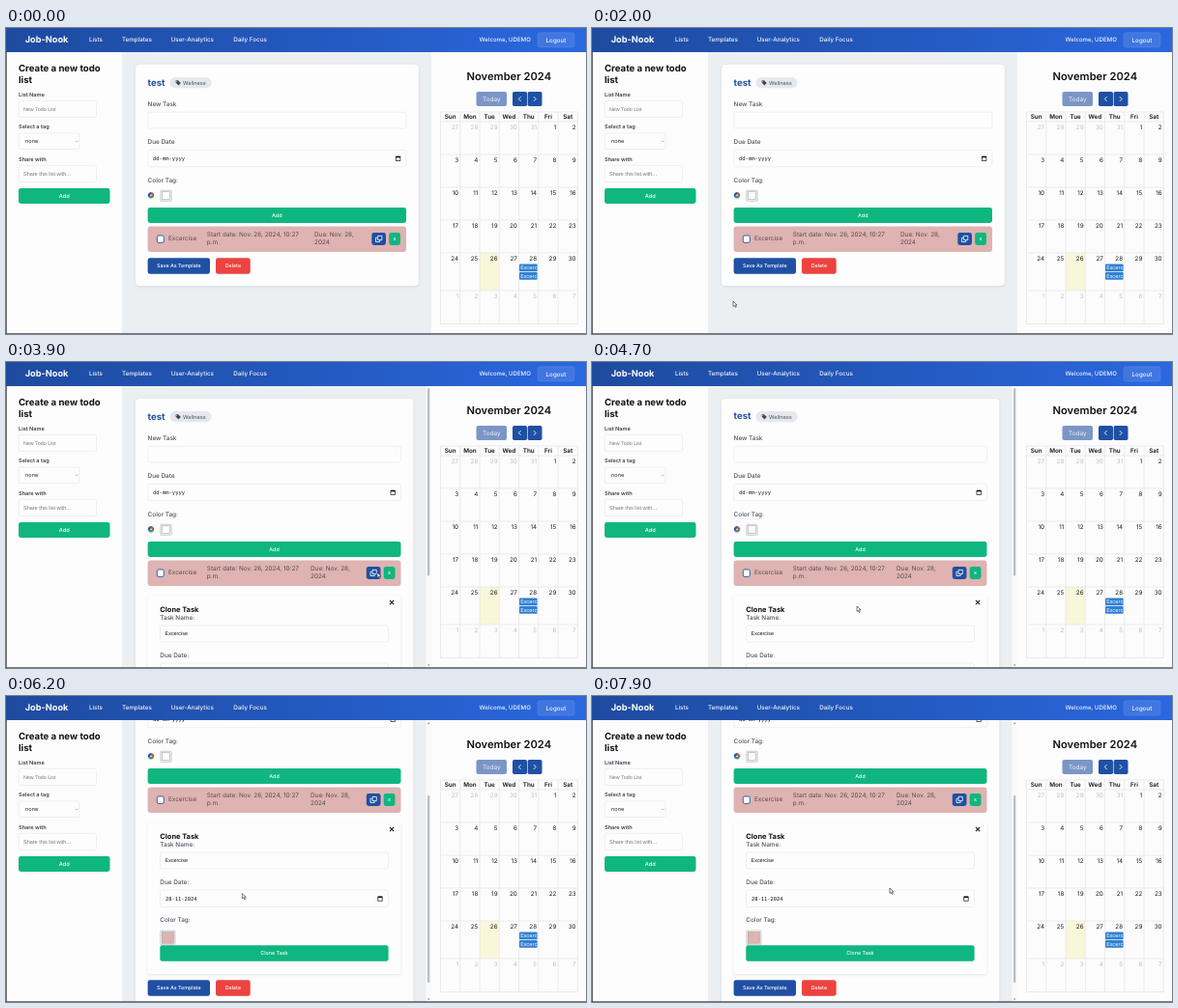
These frames come from a looping animation (600x317 px, 8000 ms). An HTML page:

```html
<!DOCTYPE html>
<html lang="en">
<head>
<meta charset="utf-8">
<title>Todo list</title>
<style>
  html, body { margin: 0; width: 100%; height: 100%; overflow: hidden; background: #fcfcfd; }
  svg { display: block; width: 600px; height: 317px; }
  text { font-family: Inter, sans-serif; text-rendering: geometricPrecision; white-space: pre; }
  .field { font-family: "Liberation Sans", Arial, sans-serif; }
  .mono { font-family: "DejaVu Sans Mono", monospace; }
  .card { filter: drop-shadow(0 1px 1.5px rgba(0, 0, 0, .09)); }
</style>
</head>
<body>
<svg id="stage" viewBox="0 0 600 317">
  <defs>
    <linearGradient id="bar">
      <stop offset="0" stop-color="#1e4b9f"/>
      <stop offset=".5" stop-color="#2358bd"/>
      <stop offset="1" stop-color="#2b68df"/>
    </linearGradient>
    <clipPath id="mainClip"><rect x="120" y="25" width="320" height="292"/></clipPath>
    <clipPath id="eventClip"><rect x="531" y="240" width="18.8" height="24"/></clipPath>
  </defs>
</svg>
<script>
const NS = "http://www.w3.org/2000/svg";
const stage = document.getElementById("stage");
const BLUE = "#1f50a3", GREEN = "#10b67f", RED = "#ec4340", PINK = "#deb3b1";
const INK = "#111", GREY = "#4b525c", LINE = "#e4e6ea";

function add(parent, tag, attrs, content) {
  const el = document.createElementNS(NS, tag);
  for (const key in attrs) el.setAttribute(key, attrs[key]);
  if (content !== undefined) el.textContent = content;
  parent.appendChild(el);
  return el;
}
const group = (parent, attrs = {}) => add(parent, "g", attrs);
const box = (parent, x, y, x2, y2, fill, more = {}) =>
  add(parent, "rect", { x, y, width: x2 - x, height: y2 - y, fill, ...more });
const path = (parent, d, stroke, width, more = {}) =>
  add(parent, "path", { d, fill: "none", stroke, "stroke-width": width, ...more });
const label = (parent, x, y, content, size, fill, weight = 400, more = {}) =>
  add(parent, "text", { x, y, "font-size": size, fill, "font-weight": weight, ...more }, content);
const mid = { "text-anchor": "middle" };

function button(parent, x, y, x2, y2, fill, content, size = 5.35) {
  box(parent, x, y, x2, y2, fill, { rx: 2.4 });
  label(parent, (x + x2) / 2, (y + y2) / 2 + size * .36, content, size, "#fff", 500, mid);
}
function input(parent, x, y, x2, y2) {
  box(parent, x, y, x2, y2, "#fdfdfe", { rx: 2, stroke: LINE, "stroke-width": .6 });
}
function dateIcon(parent, x, y) {
  box(parent, x - 2.2, y - 1.8, x + 2.2, y + 2.4, "none", { stroke: "#111", "stroke-width": .7 });
  box(parent, x - 2.2, y - 2.2, x + 2.2, y - .7, "#111");
}
function swatch(parent, x, y, x2, y2, fill) {
  box(parent, x, y, x2, y2, "#f0f0f0", { stroke: "#b5b5b5", "stroke-width": .6, rx: .6 });
  box(parent, x + 1.6, y + 1.6, x2 - 1.6, y2 - 1.6, fill, { stroke: "#999", "stroke-width": .5 });
}

function sidebar(g) {
  box(g, 0, 25, 120, 317, "#fcfcfd");
  label(g, 13, 45.2, "Create a new todo", 9.6, INK, 700);
  label(g, 13, 56.8, "list", 9.6, INK, 700);
  label(g, 13, 70.8, "List Name", 5.6, "#3a414c", 600);
  input(g, 13.2, 75.3, 93.5, 92.5);
  label(g, 18, 85.8, "New Todo List", 5.35, "#767676", 400, { class: "field" });
  label(g, 13, 104.2, "Select a tag", 5.6, "#3a414c", 600);
  input(g, 13.2, 109, 76, 125.5);
  label(g, 20, 119.3, "none", 5.6, "#222");
  path(g, "M72 116.8l1.3 1.3 1.3-1.3", "#7d8a99", .6);
  label(g, 13, 138, "Share with", 5.6, "#3a414c", 600);
  input(g, 13.2, 142.3, 93.5, 159.5);
  label(g, 18, 152.8, "Share this list with...", 5.5, "#767676", 400, { class: "field" });
  button(g, 13, 166, 107.5, 182, GREEN, "Add", 5.7);
}

function calendar(g) {
  const left = 449.5, step = 20.26, rows = [97, 131, 165, 199, 233, 272, 306.5];
  box(g, 440, 25, 600, 317, "#fcfcfd");
  label(g, 520.3, 54, "November 2024", 11.2, INK, 600, mid);
  box(g, 486.5, 66, 518, 81, "#7b96c6", { rx: 2 });
  label(g, 502.3, 75.7, "Today", 6.4, "#e9eff8", 400, mid);
  box(g, 524, 66, 539, 81, BLUE, { rx: 1.8 });
  box(g, 539.6, 66, 554.5, 81, BLUE, { rx: 1.8 });
  path(g, "M532.6 71.2l-2.3 2.3 2.3 2.3M545.9 71.2l2.3 2.3-2.3 2.3", "#fff", .9);
  box(g, left + 2 * step, 233, left + 3 * step, 272, "#f8f7d9");

  let lines = `M${left} 87H591.3`;
  for (const y of rows) lines += `M${left} ${y}H591.3`;
  for (let c = 0; c <= 7; c++) lines += `M${left + c * step} 87V306.5`;
  path(g, lines, "#dfe0e3", .6);

  ["Sun", "Mon", "Tue", "Wed", "Thu", "Fri", "Sat"].forEach((day, c) =>
    label(g, left + (c + .5) * step, 94.3, day, 6.3, INK, 600, mid));
  for (let i = 0; i < 42; i++) {
    const date = new Date(2024, 9, 27 + i), c = i % 7;
    label(g, left + (c + 1) * step - 1.7, rows[(i - c) / 7] + 7.8, date.getDate(), 6.3,
      date.getMonth() === 10 ? "#1c1c1c" : "#bdbdbf", 400, { "text-anchor": "end" });
  }
  const events = group(g, { "clip-path": "url(#eventClip)" });
  for (const y of [244.4, 253]) {
    box(events, 531, y, 549.8, y + 7.8, "#3080d2", { rx: 1 });
    label(events, 532.2, y + 5.8, "Excercise", 5.4, "#fff");
  }
}

function cloneBox(g, right) {
  const b = group(g);
  box(b, 146.6, 242, right, 399, "#fdfdfe", { rx: 3, class: "card" });
  label(b, 159.3, 258.8, "Clone Task", 7.45, INK, 700);
  path(b, "M397 246.9l4.2 4.2M401.2 246.9l-4.2 4.2", "#111", 1.1);
  label(b, 159.3, 266.8, "Task Name:", 6.4, GREY, 500);
  input(b, 159.5, 273, 395.5, 290);
  label(b, 164.6, 283.4, "Excercise", 5.4, "#111", 400, { class: "field" });
  label(b, 159.3, 306, "Due Date:", 6.4, GREY, 500);
  input(b, 159.5, 312, 395.5, 329.5);
  label(b, 165, 322.9, "28-11-2024", 5.4, "#111", 400, { class: "mono" });
  dateIcon(b, 387, 320.8);
  label(b, 159.3, 345.4, "Color Tag:", 6.4, GREY, 500);
  swatch(b, 159.8, 354, 175, 368.8, PINK);
  button(b, 159.3, 369.2, 395.6, 385.8, GREEN, "Clone Task");
}

function form(parent, open) {
  const g = group(parent);
  const right = open ? 408.5 : 414, shift = right - 414, drop = open ? 167 : 0;
  box(g, 134, 38, right + 12.8, 267 + drop, "#fdfdfe", { rx: 4, class: "card" });
  label(g, 146.6, 59.5, "test", 9.6, BLUE, 700);
  box(g, 169.5, 51, 212.6, 62.2, "#e5e8ec", { rx: 5.6 });
  add(g, "path", { d: "M175.6 54.2h2.5l2.7 2.7-2.4 2.5-2.8-2.8z", fill: "#3f4854" });
  add(g, "circle", { cx: 176.7, cy: 55.3, r: .5, fill: "#e5e8ec" });
  label(g, 183, 58.6, "Wellness", 5.6, GREY);

  label(g, 146.6, 81.2, "New Task", 6.4, GREY, 500);
  input(g, 146.8, 87.2, right, 104);
  label(g, 146.6, 120.2, "Due Date", 6.4, GREY, 500);
  input(g, 146.8, 126.2, right, 143.7);
  label(g, 152, 137, "dd-mm-yyyy", 5.5, "#222", 400, { class: "mono" });
  dateIcon(g, right - 8.3, 135);
  label(g, 146.6, 159.7, "Color Tag:", 6.4, GREY, 500);
  [["#e2453c", 0], ["#3b9a58", 120], ["#3158b0", 240]].forEach(([fill, turn]) =>
    add(g, "path", { d: "M150 173.3v-3.3a3.3 3.3 0 0 1 2.86 4.95z", fill, transform: `rotate(${turn} 150 173.3)` }));
  add(g, "circle", { cx: 150, cy: 173.3, r: .8, fill: "#fff" });
  swatch(g, 159.8, 168.2, 171.2, 179.3, "#fff");
  button(g, 146.6, 186, right, 202, GREEN, "Add");

  box(g, 146.6, 205.4, right, 232, PINK, { rx: 3 });
  box(g, 156.3, 215, 163.3, 222.4, "#fff", { rx: 1.6, stroke: BLUE, "stroke-width": .9 });
  const due = open ? 315 : 319;
  for (const [x, y, words] of [
    [168, 220.4, "Excercise"], [207.8, 216.3, "Start date: Nov. 26, 2024, 10:27"], [207.8, 224.1, "p.m."],
    [due, 216.3, "Due: Nov. 28,"], [due, 224.1, "2024"]
  ]) label(g, x, y, words, 6.4, "#574b50");

  const icons = group(g, { transform: `translate(${shift} 0)` });
  box(icons, 378.3, 212, 393, 225, BLUE, { rx: 2.4 });
  path(icons, "M384.6 215.4h4.2v4.2h-4.2zM384.2 217.3h-1.7v4.2h4.2v-1.7", "#fff", .8);
  button(icons, 396.2, 212, 408, 225, GREEN, "x");

  if (open) cloneBox(g, right);
  const foot = group(g, { transform: `translate(0 ${drop})` });
  button(foot, 146.6, 238.2, 211, 254.8, BLUE, "Save As Template");
  button(foot, 217, 238.2, 252.7, 254.8, RED, "Delete");
  return g;
}

function header(g) {
  box(g, 0, 0, 600, 25, "url(#bar)");
  label(g, 19.7, 15.3, "Job-Nook", 9.2, "#fff", 700);
  [[86, "Lists"], [120, "Templates"], [170.7, "User-Analytics"], [235.3, "Daily Focus"]]
    .forEach(([x, words]) => label(g, x, 14.3, words, 6.25, "#f3f6fc", 500));
  label(g, 489.5, 14.3, "Welcome, UDEMO", 6.1, "#f3f6fc", 500);
  box(g, 550, 4.8, 588, 20, "#fff", { rx: 2.4, "fill-opacity": .1, stroke: "#fff", "stroke-opacity": .2, "stroke-width": .5 });
  label(g, 569, 14.5, "Logout", 6.25, "#f3f6fc", 500, mid);
}

box(stage, 0, 0, 600, 317, "#ebeff2");
const main = group(stage, { "clip-path": "url(#mainClip)" });
const closedForm = form(main, false);
const openForm = form(main, true);
const scroller = group(main);
box(scroller, 434.3, 25, 440, 317, "#fafafb");
add(scroller, "path", { d: "M436 28.8l1.2-1.6 1.2 1.6zM436 313.4l1.2 1.6 1.2-1.6z", fill: "#777" });
const thumb = box(scroller, 436, 27.5, 438.3, 221.5, "#bcbec1", { rx: 1.1 });
sidebar(group(stage));
calendar(group(stage));
header(group(stage));
box(stage, 0, 25, .7, 317, "#333");
box(stage, 0, 316.3, 600, 317, "#444");
const cursor = add(stage, "path", {
  d: "M0 0v5.4l1.3-1.1 1 2.1 1-.45-1-2.05h1.7z", fill: "#fff", stroke: "#222", "stroke-width": .6
});

// Rows are [ms, ...values]; values ease between neighbouring rows.
const pointer = [
  [1500, 120, 319], [1900, 146, 283], [2200, 146, 283], [3100, 367, 227.5], [3500, 384, 218],
  [4000, 384, 218], [4500, 274, 253], [5100, 274, 253], [6000, 244.3, 204.5],
  [6500, 244.3, 204.5], [7500, 308, 199], [8000, 308, 199]
];
const scroll = [[4700, 0], [4900, 104], [5000, 111]];
const CLONE_OPENS = 3900;

function at(rows, t) {
  if (t <= rows[0][0]) return rows[0].slice(1);
  const i = rows.findIndex(row => row[0] > t);
  if (i < 0) return rows[rows.length - 1].slice(1);
  const a = rows[i - 1], b = rows[i], p = (t - a[0]) / (b[0] - a[0]);
  const e = p * p * (3 - 2 * p);
  return a.slice(1).map((v, k) => v + (b[k + 1] - v) * e);
}

function draw(now) {
  const t = now % 8000, open = t >= CLONE_OPENS;
  const [x, y] = at(pointer, t), [top] = at(scroll, t);
  closedForm.style.display = open ? "none" : "";
  openForm.style.display = scroller.style.display = open ? "" : "none";
  openForm.setAttribute("transform", `translate(0 ${-top})`);
  thumb.setAttribute("y", 27.5 + top * .68);
  cursor.style.display = t < 1500 ? "none" : "";
  cursor.setAttribute("transform", `translate(${x} ${y})`);
}

const start = performance.now();
function tick() {
  draw(performance.now() - start);
  requestAnimationFrame(tick);
}
tick();
</script>
</body>
</html>
```
